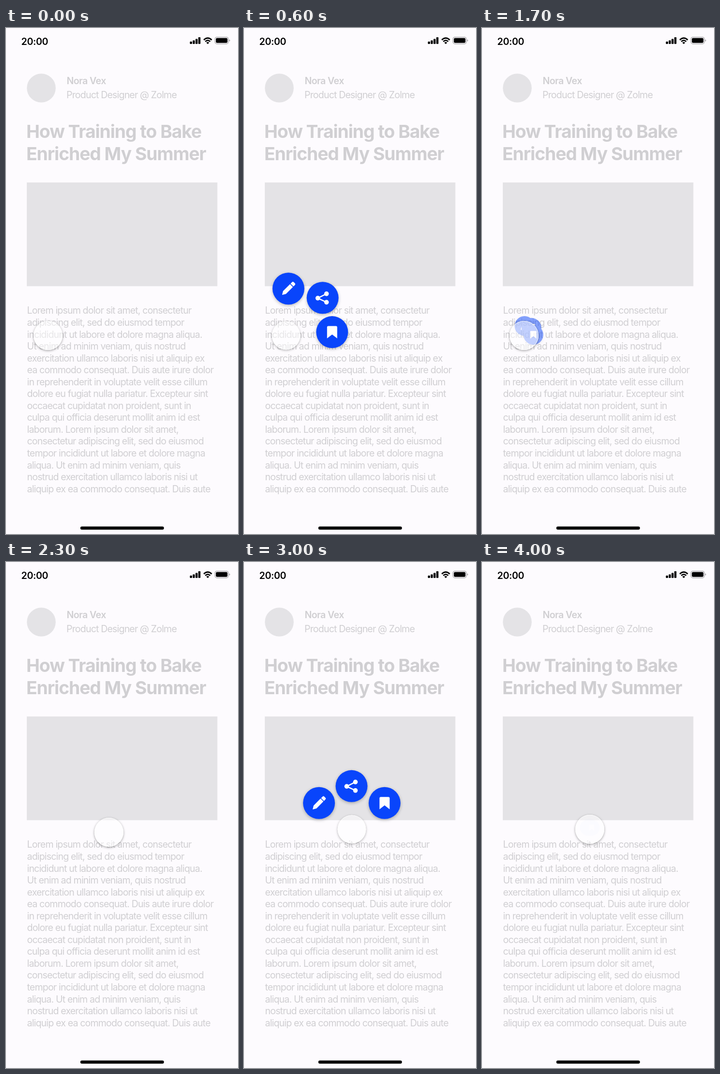
Write an HTML page with a canvas that moves like this. It is 480x1045 px and loops after 4400 ms.

```html
<!DOCTYPE html>
<html lang="en">
<head>
<meta charset="utf-8">
<title>Touch menu</title>
<style>
  html, body { margin: 0; width: 100%; height: 100%; overflow: hidden; background: #fdfbfe; }
  svg, canvas { position: absolute; left: 0; top: 0; display: block; }
  text { font-family: Inter, "Noto Sans", sans-serif; font-optical-sizing: none; fill: #d0cfd2; }
  .clock { font-size: 19.6px; font-weight: 600; letter-spacing: -0.3px; fill: #000; }
  .name { font-size: 19.6px; font-weight: 600; letter-spacing: -0.6px; }
  .title { font-size: 37.3px; font-weight: 700; letter-spacing: -1.05px; }
  .body { font-size: 19.6px; letter-spacing: -0.85px; }
</style>
</head>
<body>
<svg id="page" width="480" height="1045" viewBox="0 0 480 1045">
  <text class="clock" x="31.5" y="34.5">20:00</text>
  <g>
    <rect x="380.5" y="28" width="4.4" height="5" rx="1.2"/>
    <rect x="386.3" y="25.5" width="4.4" height="7.5" rx="1.2"/>
    <rect x="392.1" y="22.5" width="4.4" height="10.5" rx="1.2"/>
    <rect x="397.9" y="19" width="4.4" height="14" rx="1.2"/>
  </g>
  <g fill="none" stroke="#000" stroke-width="2.8">
    <path d="M409.2 24.6Q417.4 17 425.6 24.6"/>
    <path d="M412.3 28Q417.4 23.2 422.5 28"/>
    <path d="M414.4 30.2Q417.4 27.6 420.4 30.2L417.4 33.2Z" fill="#000" stroke="none"/>
  </g>
  <rect x="432.2" y="18.8" width="28" height="14" rx="4.2" fill="none" stroke="#a3a2a5" stroke-width="1.2"/>
  <rect x="434.2" y="20.8" width="24" height="10" rx="2.4"/>
  <path d="M461.6 23.6q2 .8 2 2.2t-2 2.2z" fill="#a3a2a5"/>

  <circle cx="73" cy="124" r="29.8" fill="#e4e3e6"/>
  <text class="name" x="125.5" y="116.3">Nora Vex</text>
  <text class="body" x="125" y="145">Product Designer @ Zolme</text>
  <text class="title" x="42" y="226.8">How Training to Bake</text>
  <text class="title" x="42" y="273.3">Enriched My Summer</text>
  <rect x="43" y="319" width="394.3" height="214.3" fill="#e4e3e6"/>
  <g id="article"></g>
  <rect x="153.8" y="1029.4" width="173" height="6.6" rx="3.3"/>
</svg>
<canvas id="stage" width="480" height="1045"></canvas>
<script>
const LOOP = 4400, STEP = 100, LAST_CHANGE = 4000;
const WIDTH = 480, HEIGHT = 1045;
const BLUE = '#0945fb';
const ctx = document.getElementById('stage').getContext('2d');

// The buttons are composed here first, so that they fade as one group.
const layer = document.createElement('canvas');
layer.width = WIDTH;
layer.height = HEIGHT;
const group = layer.getContext('2d');

const paragraph = [
  'Lorem ipsum dolor sit amet, consectetur',
  'adipiscing elit, sed do eiusmod tempor',
  'incididunt ut labore et dolore magna aliqua.',
  'Ut enim ad minim veniam, quis nostrud',
  'exercitation ullamco laboris nisi ut aliquip ex',
  'ea commodo consequat. Duis aute irure dolor',
  'in reprehenderit in voluptate velit esse cillum',
  'dolore eu fugiat nulla pariatur. Excepteur sint',
  'occaecat cupidatat non proident, sunt in',
  'culpa qui officia deserunt mollit anim id est',
  'laborum. Lorem ipsum dolor sit amet,',
  'consectetur adipiscing elit, sed do eiusmod',
  'tempor incididunt ut labore et dolore magna',
  'aliqua. Ut enim ad minim veniam, quis',
  'nostrud exercitation ullamco laboris nisi ut',
  'aliquip ex ea commodo consequat. Duis aute'
];
const article = document.getElementById('article');
paragraph.forEach((line, i) => {
  const text = document.createElementNS('http://www.w3.org/2000/svg', 'text');
  text.setAttribute('class', 'body');
  text.setAttribute('x', 43.5);
  text.setAttribute('y', 590.4 + i * 24.55);
  text.textContent = line;
  article.append(text);
});

// Offsets are for pencil, share and bookmark, relative to the touch point.
const menus = [
  { x: 87, y: 635, open: 200, close: 1300, offsets: [[5, -98.5], [77, -79], [97, -7]] },
  { x: 223, y: 552, open: 2500, close: 3400, offsets: [[-67, -53.5], [-0.5, -88], [67, -53.5]] }
];

const clamp = v => Math.min(1, Math.max(0, v));
const mix = (a, b, k) => a + (b - a) * k;
const smooth = k => k * k * (3 - 2 * k);

// Lightly underdamped spring outwards, critically damped return.
function springOut(s) {
  const decay = 7.6, freq = 5.7;
  return 1 - Math.exp(-decay * s) * (Math.cos(freq * s) + decay / freq * Math.sin(freq * s));
}
const settleBack = s => Math.exp(-7.5 * s) * (1 + 7.5 * s);

function spread(menu, t) {
  if (t < menu.open) return 0;
  return t < menu.close ? springOut((t - menu.open) / 1000) : settleBack((t - menu.close) / 1000);
}

function disc(c, x, y, r) {
  c.beginPath();
  c.arc(x, y, r, 0, Math.PI * 2);
}

function shadow(c, alpha, blur, dy) {
  c.shadowColor = `rgba(0,0,0,${alpha})`;
  c.shadowBlur = blur;
  c.shadowOffsetY = dy;
}

function pencil(c) {
  c.rotate(-Math.PI / 4);
  c.beginPath();
  c.moveTo(-18.5, 0);
  c.lineTo(-11.5, -4.2);
  c.lineTo(8.8, -4.2);
  c.lineTo(8.8, 4.2);
  c.lineTo(-11.5, 4.2);
  c.closePath();
  c.roundRect(10.4, -4.2, 6.8, 8.4, [0, 2.4, 2.4, 0]);
  c.fill();
}

function share(c) {
  const nodes = [[8, -8.5], [-10, 0.5], [8, 9]];
  c.lineWidth = 2.7;
  c.beginPath();
  nodes.forEach(([x, y]) => c.lineTo(x, y));
  c.stroke();
  for (const [x, y] of nodes) {
    disc(c, x, y, 4.8);
    c.fill();
  }
}

function bookmark(c) {
  c.beginPath();
  c.moveTo(-10.5, 13);
  c.lineTo(-10.5, -10);
  c.quadraticCurveTo(-10.5, -12.5, -8, -12.5);
  c.lineTo(8, -12.5);
  c.quadraticCurveTo(10.5, -12.5, 10.5, -10);
  c.lineTo(10.5, 13);
  c.lineTo(0, 4.8);
  c.fill();
}

const icons = [pencil, share, bookmark];

function drawMenu(menu, t) {
  const p = spread(menu, t);
  const alpha = clamp(3.4 * p - 0.18);
  if (!alpha) return;
  const scale = Math.min(1, 0.44 + 0.9 * p);
  group.clearRect(0, 0, WIDTH, HEIGHT);
  menu.offsets.forEach(([dx, dy], i) => {
    group.save();
    group.translate(menu.x + dx * p, menu.y + dy * p);
    group.scale(scale, scale);
    shadow(group, 0.28 * alpha, 6, 2);
    group.fillStyle = BLUE;
    disc(group, 0, 0, 33);
    group.fill();
    group.shadowColor = 'transparent';
    group.fillStyle = group.strokeStyle = '#fff';
    icons[i](group);
    group.restore();
  });
  ctx.globalAlpha = alpha;
  ctx.drawImage(layer, 0, 0);
  ctx.globalAlpha = 1;
}

function pressure(t) {
  return menus.reduce((sum, m) =>
    sum + smooth(clamp((t - m.open + 100) / 300)) - smooth(clamp((t - m.close) / 400)), 0);
}

function drawTouch(t) {
  const k = smooth(clamp((t - 1800) / 600));
  const x = mix(menus[0].x, menus[1].x, k);
  const y = mix(menus[0].y, menus[1].y, k);
  const press = pressure(t);
  const r = mix(30, 29.3, press);

  // The shadow stays outside the translucent disc.
  ctx.save();
  ctx.beginPath();
  ctx.rect(0, 0, WIDTH, HEIGHT);
  ctx.arc(x, y, r, 0, Math.PI * 2);
  ctx.clip('evenodd');
  shadow(ctx, mix(0.37, 0.3, press), 5, 1.5);
  ctx.fillStyle = '#fff';
  disc(ctx, x, y, r);
  ctx.fill();
  ctx.restore();

  ctx.fillStyle = 'rgba(255,255,255,.5)';
  disc(ctx, x, y, r);
  ctx.fill();
  ctx.strokeStyle = 'rgba(255,255,255,.7)';
  ctx.lineWidth = 1;
  disc(ctx, x, y, r - 0.5);
  ctx.stroke();
}

function render(now) {
  const t = Math.min(LAST_CHANGE, Math.floor(now % LOOP / STEP) * STEP);
  ctx.clearRect(0, 0, WIDTH, HEIGHT);
  menus.forEach(menu => drawMenu(menu, t));
  drawTouch(t);
}

const start = performance.now();
function tick() {
  render(performance.now() - start);
  requestAnimationFrame(tick);
}
tick();
</script>
</body>
</html>
```
